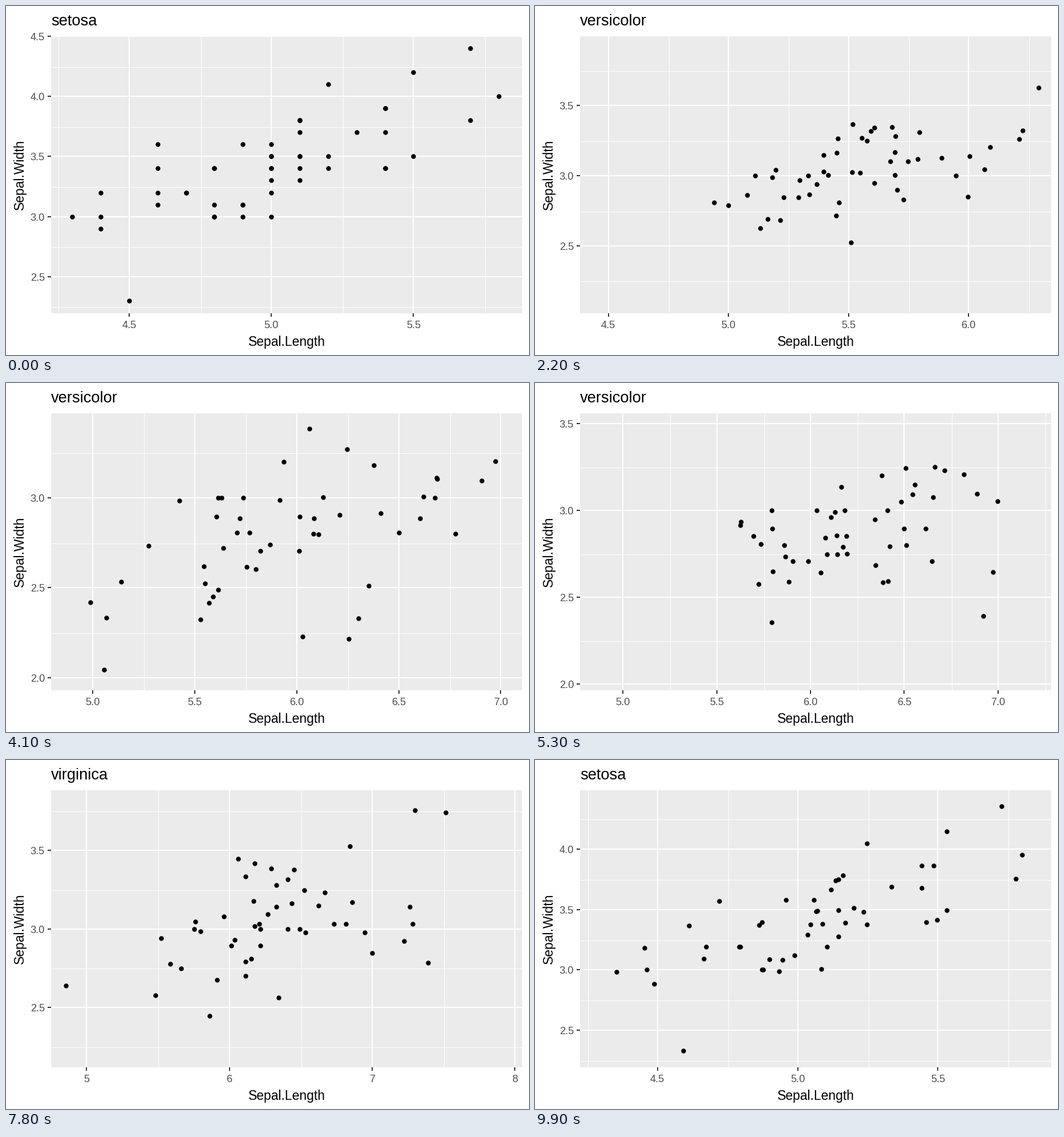
A matplotlib script that plays this animation: 917 px wide and 611 px high, repeating every 10 s.

```python
import math

import matplotlib.pyplot as plt
import numpy as np
from matplotlib.animation import FuncAnimation
from matplotlib.collections import LineCollection
from matplotlib.patches import Rectangle

W, H, DPI = 917, 611, 100
FRAMES, INTERVAL = 100, 100
LEFT, RIGHT, TOP, BOTTOM = 78.5, 905, 53, 538
PX = 72 / DPI  # points per pixel

plt.rcParams["font.family"] = ["Liberation Sans", "DejaVu Sans"]

# Measurements in tenths, one list of lengths and one of widths per species.
SETOSA_LEN = [
    51, 49, 47, 46, 50, 54, 46, 50, 44, 49, 54, 48, 48, 43, 58, 57, 54,
    51, 57, 51, 54, 51, 46, 51, 48, 50, 50, 52, 52, 47, 48, 54, 52, 55,
    49, 50, 55, 49, 44, 51, 50, 45, 44, 50, 51, 48, 51, 46, 53, 50]
SETOSA_WID = [
    35, 30, 32, 31, 36, 39, 34, 34, 29, 31, 37, 34, 30, 30, 40, 44, 39,
    35, 38, 38, 34, 37, 36, 33, 34, 30, 34, 35, 34, 32, 31, 34, 41, 42,
    31, 32, 35, 36, 30, 34, 35, 23, 32, 35, 38, 30, 38, 32, 37, 33]
VERSICOLOR_LEN = [
    70, 64, 69, 55, 65, 57, 63, 49, 66, 52, 50, 59, 60, 61, 56, 67, 56,
    58, 62, 56, 59, 61, 63, 61, 64, 66, 68, 67, 60, 57, 55, 55, 58, 60,
    54, 60, 67, 63, 56, 55, 55, 61, 58, 50, 56, 57, 57, 62, 51, 57]
VERSICOLOR_WID = [
    32, 32, 31, 23, 28, 28, 33, 24, 29, 27, 20, 30, 22, 29, 29, 31, 30,
    27, 22, 25, 32, 28, 25, 28, 29, 30, 28, 30, 29, 26, 24, 24, 27, 27,
    30, 34, 31, 23, 30, 25, 26, 30, 26, 23, 27, 30, 29, 29, 25, 28]
VIRGINICA_LEN = [
    63, 58, 71, 63, 65, 76, 49, 73, 67, 72, 65, 64, 68, 57, 58, 64, 65,
    77, 77, 60, 69, 56, 77, 63, 67, 72, 62, 61, 64, 72, 74, 79, 64, 63,
    61, 77, 63, 64, 60, 69, 67, 69, 58, 68, 67, 67, 63, 65, 62, 59]
VIRGINICA_WID = [
    33, 27, 30, 29, 30, 30, 25, 29, 25, 36, 32, 27, 30, 25, 28, 32, 30,
    38, 26, 22, 32, 28, 28, 27, 33, 32, 28, 30, 28, 30, 28, 38, 28, 28,
    26, 30, 34, 31, 30, 31, 31, 31, 27, 32, 33, 30, 25, 30, 34, 30]

NAMES = ["setosa", "versicolor", "virginica"]
STATES = [
    np.column_stack(pair) / 10
    for pair in ((SETOSA_LEN, SETOSA_WID),
                 (VERSICOLOR_LEN, VERSICOLOR_WID),
                 (VIRGINICA_LEN, VIRGINICA_WID))]

# (start, end) frames of each move to the next species
POINT_MOVES = [(6, 33), (40, 67), (74, 100)]
VIEW_MOVES = [(12, 34), (46, 68), (80, 101)]


def phase(frame, moves):
    """Index of the state being left and the linear progress to the next."""
    for i, (start, end) in enumerate(moves):
        if frame <= end:
            return i, max(0.0, (frame - start) / (end - start))
    return 0, 0.0


def zoom(a, b, t):
    """Smooth pan and zoom (van Wijk) from range a to range b."""
    w0, w1 = a[1] - a[0], b[1] - b[0]
    c0, c1 = sum(a) / 2, sum(b) / 2
    d = abs(c1 - c0)
    grow = w1 * w1 - w0 * w0
    r0 = -math.asinh((grow + d * d) / (2 * w0 * d))
    r1 = -math.asinh((grow - d * d) / (2 * w1 * d))
    r = r0 + (r1 - r0) * t
    u = w0 * (math.cosh(r0) * math.tanh(r) - math.sinh(r0))
    w = w0 * math.cosh(r0) / math.cosh(r)
    c = c0 + math.copysign(u, c1 - c0)
    return c - 0.55 * w, c + 0.55 * w  # 5 % margin on both sides


def view(frame):
    # The first frame still shows the last step of the closing move.
    i, t = phase(frame or FRAMES, VIEW_MOVES)
    t = (1 - math.cos(math.pi * t)) / 2
    here, there = STATES[i], STATES[(i + 1) % 3]
    return [zoom((here[:, k].min(), here[:, k].max()),
                 (there[:, k].min(), there[:, k].max()), t) for k in (0, 1)]


def breaks(lo, hi, m=5):
    """Nice axis breaks after Talbot's extended labelling."""
    best, result = -9.0, (lo, 1.0, 2)
    span = hi - lo
    for i, q in enumerate((1, 5, 2, 2.5, 4, 3)):
        for k in range(2, 10):
            z0 = math.ceil(math.log10(span / (k + 1) / q))
            for z in (z0, z0 + 1):
                step = q * 10.0 ** z
                first = math.floor(hi / step) - (k - 1)
                for s in range(first, math.ceil(lo / step) + 1):
                    a, b = s * step, (s + k - 1) * step
                    cover = 1 - 0.5 * ((hi - b) ** 2 + (lo - a) ** 2) \
                        / (0.1 * span) ** 2
                    ratio = (k - 1) / (b - a) \
                        * (max(b, hi) - min(a, lo)) / (m - 1)
                    dense = 2 - max(ratio, 1 / ratio)
                    score = 0.25 * (1 - i / 5) + 0.2 * cover \
                        + 0.5 * dense + 0.05
                    if score > best:
                        best, result = score, (a, step, k)
    a, step, k = result
    return a + step * np.arange(k), step


def inside(values, lo, hi):
    return [v for v in values if lo <= v <= hi]


fig = plt.figure(figsize=(W / DPI, H / DPI), dpi=DPI, facecolor="white")
ax = fig.add_axes([0, 0, 1, 1])
ax.set_xlim(0, W)
ax.set_ylim(H, 0)
ax.axis("off")

panel = Rectangle((79, TOP), RIGHT - 79, BOTTOM - TOP,
                  fc="#EBEBEB", ec="none", zorder=0)
ax.add_patch(panel)


def add_lines(width, color, zorder):
    lines = LineCollection([], linewidths=width * PX, colors=color,
                           zorder=zorder)
    ax.add_collection(lines, autolim=False)
    return lines


def add_text(x, y, text, size, color="black", **kw):
    return ax.text(x, y, text, fontsize=size * PX, color=color,
                   va="baseline", **kw)


minor = add_lines(1, "white", 1)
major = add_lines(2, "white", 2)
ticks = add_lines(2, "#333333", 2)
dots = ax.scatter(*STATES[0].T, s=(8.4 * PX) ** 2, c="black",
                  linewidths=0, zorder=3)
dots.set_clip_path(panel)

title = add_text(79, 34, "", 27.3)
add_text(492, 595, "Sepal.Length", 22.9, ha="center")
ax.text(31, 295.5, "Sepal.Width", fontsize=22.9 * PX, rotation=90,
        rotation_mode="anchor", ha="center", va="baseline")
x_labels = [add_text(0, 564, "", 18.3, "#4D4D4D", ha="center")
            for _ in range(10)]
y_labels = [add_text(68, 0, "", 18.3, "#4D4D4D", ha="right")
            for _ in range(10)]


def fill_labels(labels, values, step, place):
    digits = 0 if step >= 1 else 1 if abs(step * 10 % 1) < 1e-6 else 2
    for label in labels:
        label.set_text("")
    for label, v in zip(labels, values):
        label.set_text(f"{v:.{digits}f}")
        place(label, v)


def draw(frame):
    (x0, x1), (y0, y1) = view(frame)

    def px(v):
        return LEFT + (v - x0) / (x1 - x0) * (RIGHT - LEFT)

    def py(v):
        return BOTTOM - (v - y0) / (y1 - y0) * (BOTTOM - TOP)

    def grid(xs, ys, shift):
        cols = [round(px(v)) + shift for v in xs]
        rows = [round(py(v)) + shift for v in ys]
        return ([[(c, TOP), (c, BOTTOM)] for c in cols]
                + [[(79, r), (RIGHT, r)] for r in rows])

    xb, xstep = breaks(x0, x1)
    yb, ystep = breaks(y0, y1)
    xs, ys = inside(xb, x0, x1), inside(yb, y0, y1)
    xm = inside(np.append(xb - xstep / 2, xb[-1] + xstep / 2), x0, x1)
    ym = inside(np.append(yb - ystep / 2, yb[-1] + ystep / 2), y0, y1)
    minor.set_segments(grid(xm, ym, 0.5))
    major.set_segments(grid(xs, ys, 0))
    ticks.set_segments(
        [[(round(px(v)), BOTTOM), (round(px(v)), BOTTOM + 6)] for v in xs]
        + [[(73, round(py(v))), (79, round(py(v)))] for v in ys])
    fill_labels(x_labels, xs, xstep, lambda lab, v: lab.set_x(px(v)))
    fill_labels(y_labels, ys, ystep,
                lambda lab, v: lab.set_y(round(py(v)) + 7))

    i, t = phase(frame, POINT_MOVES)
    j = (i + 1) % 3
    points = STATES[i] + (STATES[j] - STATES[i]) * t
    dots.set_offsets(np.column_stack((px(points[:, 0]), py(points[:, 1]))))
    title.set_text(NAMES[i if t < 0.5 else j])
    return [minor, major, ticks, dots, title, *x_labels, *y_labels]


anim = FuncAnimation(fig, draw, frames=FRAMES, init_func=lambda: draw(0),
                     interval=INTERVAL, repeat=True, repeat_delay=0,
                     blit=False)
plt.show()
```
